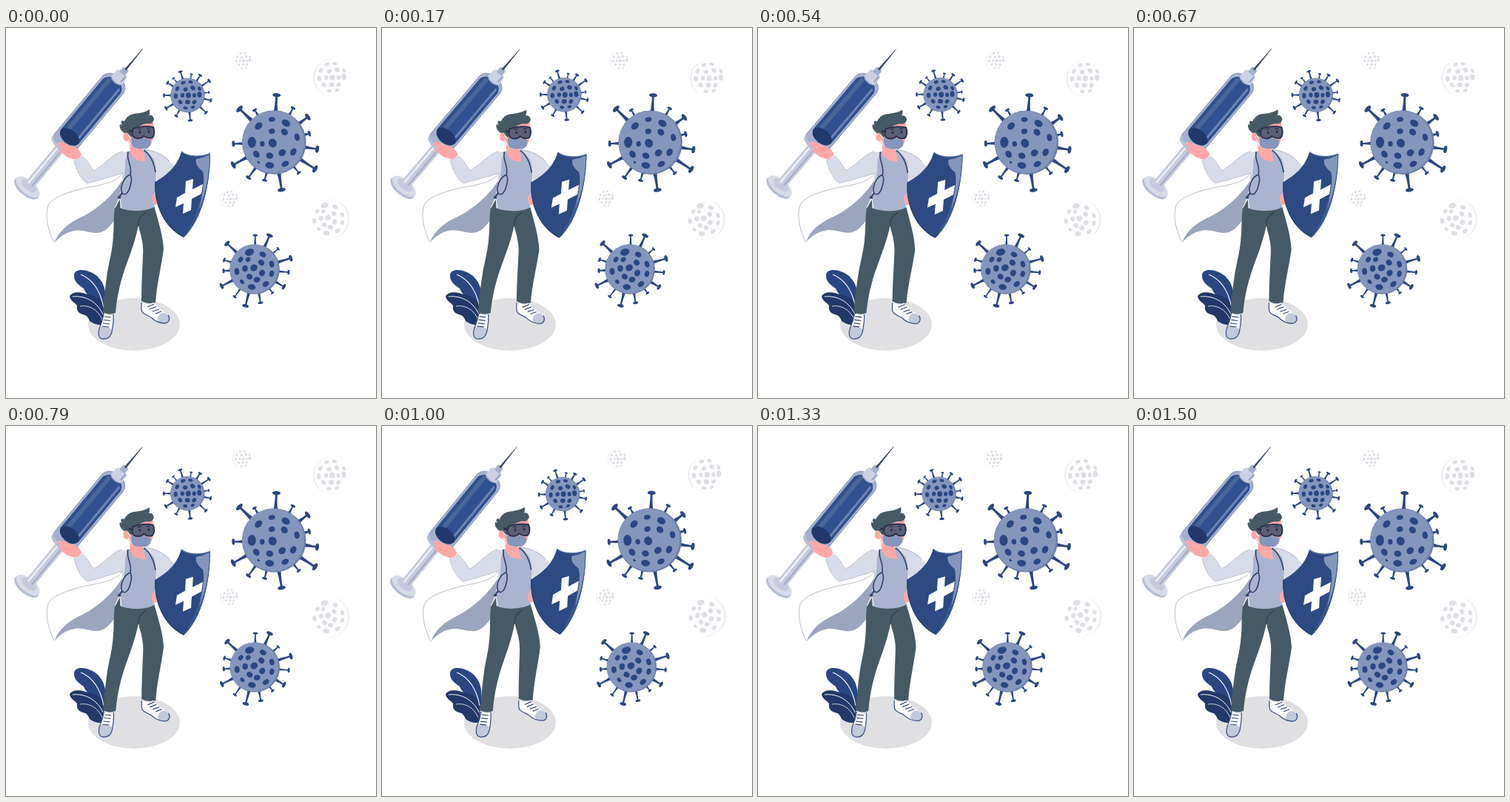
Animation, 500 px wide and 500 px high, one loop 1540 ms. Source, as an HTML page with a canvas:

```html
<!DOCTYPE html>
<html lang="en">
<head>
<meta charset="utf-8">
<title>Defence</title>
<style>
html, body { margin: 0; width: 100%; height: 100%; overflow: hidden; background: #fff; }
canvas { display: block; width: 500px; height: 500px; }
</style>
</head>
<body>
<canvas id="stage" width="500" height="500"></canvas>
<script>
const ctx = document.getElementById('stage').getContext('2d');
const LOOP = 1540, FPS = 24, SWAY = 1500;

const NAVY = '#2a4782', DEEP = '#22386a', MID = '#8596bd', PALE = '#d8dce8',
      SLATE = '#455a64', SKIN = '#ffa8a7', CAPE = '#9ca5be', SHIRT = '#aab4cf', GHOST = '#dddfe5';

function fill(d, color) {
  ctx.fillStyle = color;
  ctx.fill(new Path2D(d));
}

function line(d, color, width = 1) {
  ctx.strokeStyle = color;
  ctx.lineWidth = width;
  ctx.stroke(new Path2D(d));
}

function oval(x, y, rx, ry, color, turn = 0) {
  ctx.fillStyle = color;
  ctx.beginPath();
  ctx.ellipse(x, y, rx, ry, turn, 0, Math.PI * 2);
  ctx.fill();
}

function placed(x, y, turn, draw) {
  ctx.save();
  ctx.translate(x, y);
  ctx.rotate(turn);
  draw();
  ctx.restore();
}

// Runs draw with the picture turned about a pivot.
function swayed(x, y, turn, draw) {
  placed(x, y, turn, () => { ctx.translate(-x, -y); draw(); });
}

// Spots are [dx, dy, size]; they flatten toward the rim of the ball.
function spots(list, r, color, scale = 1) {
  for (const [dx, dy, size] of list) {
    const x = dx * scale, y = dy * scale, s = size * scale;
    const depth = Math.sqrt(Math.max(0.2, 1 - (x * x + y * y) / (r * r)));
    oval(x, y, s * (0.35 + 0.55 * depth), s, color, Math.atan2(y, x));
  }
}

// Spikes are [degrees, reach, cap size].
function virus({ x, y, r, spikes, marks, scale }) {
  placed(x, y, 0, () => {
    for (const [deg, reach, cap] of spikes) {
      placed(0, 0, deg * Math.PI / 180, () => {
        const w = cap * 0.55;
        fill(`M${r - 2} ${-w} Q${r + 3} ${-w * .5} ${reach} ${-w * .45} V${w * .45} Q${r + 3} ${w * .5} ${r - 2} ${w}Z`, NAVY);
        oval(reach, 0, cap * 0.48, cap, NAVY);
      });
    }
    oval(0, 0, r, r, '#6d80ad');
    oval(-r * .025, -r * .015, r * .965, r * .975, MID);
    spots(marks, r, NAVY, scale);
  });
}

function ghost({ x, y, r, side, marks, scale }) {
  placed(x, y, 0, () => {
    ctx.fillStyle = GHOST;
    ctx.beginPath();
    ctx.arc(0, 0, r, -Math.PI / 2, Math.PI / 2, side < 0);
    ctx.ellipse(side * r * .02, 0, r * .94, r * .99, 0, Math.PI / 2, -Math.PI / 2, side > 0);
    ctx.fill();
    spots(marks, r, GHOST, scale);
  });
}

const bigMarks = [
  [-21, -22, 5.7], [-3, -31, 4.5], [16, -26, 6], [-3, -15, 4.2], [14, -14, 5], [31, -7, 5],
  [-30, 0, 7.5], [-16, 2, 3.7], [-2, 1, 6], [26, 13, 5.3], [11, 14, 5.2], [-24, 16, 5.2],
  [-6, 18, 4.9], [-6, 31, 6], [15, 29, 5.2], [-21, 27, 2]
];
const lowMarks = [
  [-7, -23, 6.3], [11, -20, 4.5], [-19, -13, 4], [-9, -13, 3.6], [9, -9, 4.3], [23, -7, 4.4],
  [-1, -2, 5], [-13, -1, 4.3], [-24, 3, 4.6], [10, 5, 4.5], [23, 6, 4.2],
  [-7, 10, 4.2], [3, 14, 4.5], [-4, 24, 5.3], [15, 20, 4.6], [-17, 17, 3.4]
];
const topMarks = [
  [-6, -17, 3.2], [4, -18, 3], [-14, -9, 3.3], [-3, -8, 3.2], [7, -10, 3.4], [16, -9, 3],
  [-16, 1, 3.5], [-7, 0, 3], [1, 0, 3.8], [9, 0, 3], [16, -1, 4],
  [-10, 9, 3.2], [0, 9, 3.5], [9, 9, 3.2], [-3, 17, 3], [7, 16, 2.8]
];

const viruses = [
  { x: 362.3, y: 154.5, r: 43.3, marks: bigMarks, spikes: [
    [-87, 64, 5.5], [-61, 53, 3.5], [-37, 57, 5.3], [-14, 49, 4], [9, 59, 5], [33, 66, 5.5], [51, 53, 3.3],
    [81, 65, 5.5], [104, 53, 3.5], [126, 59, 4], [151, 63, 5.3], [178, 55, 4.2], [224, 65, 5.7], [239, 51, 3.3]] },
  { x: 336, y: 326, r: 33.8, marks: lowMarks, spikes: [
    [-89, 46, 3.3], [-66, 50, 4.6], [-41, 42, 2.8], [-17, 51, 4.5], [5, 46, 3.3], [31, 46, 4.2], [53, 40, 2.7],
    [80, 46, 3.5], [104, 51, 4.4], [126, 46, 3], [153, 50, 4.3], [177, 42, 3.3], [197, 43, 3.2], [223, 51, 4.6]] },
  { x: 245.5, y: 91, r: 23.2, marks: topMarks, spikes: [
    [-107, 33.5, 3], [-80, 29, 2.2], [-58, 32, 3], [-34, 35, 3.2], [-8, 29, 2.2], [12, 32, 3], [43, 34, 3],
    [84, 34, 3.3], [119, 32, 2.8], [149, 34, 3.2], [180, 32, 3], [212, 32, 3], [230, 30, 2.2]] }
];

const ghosts = [
  { x: 440, y: 67, r: 24.5, side: -1, marks: topMarks, scale: 1.05 },
  { x: 436, y: 258, r: 27.5, side: 1, marks: lowMarks, scale: .8 },
  { x: 320.3, y: 44.3, r: 13.5, side: -1, marks: topMarks, scale: .58 },
  { x: 302.7, y: 231, r: 13, side: -1, marks: topMarks, scale: .55 }
];

function ground() {
  oval(173, 400.5, 62, 35.5, '#e0e0e3');
  fill('M131 373 C113 364 107 358 105 352 C97 347 91 341 92 333 C94 326 104 326 112 329 C124 333 132 343 134 356 V386Z', NAVY);
  fill('M86 363 C88 357 98 356 107 359 C120 361 129 366 133 376 L132 400 C125 403 117 399 113 396 C111 391 109 389 107 388 C99 386 95 383 96 376 C96 372 88 371 86 363Z', DEEP);
  line('M101 333 C118 340 128 357 132 378', '#fff', 1.1);
  line('M90 363 C108 361 124 371 131 387', '#fff', 1);
  line('M100 376 C112 374 124 380 130 394', '#fff', .8);
}

// Drawn along its own axis: thumb plate at 0, needle point at 243.
function syringe() {
  placed(29, 215.5, -0.877, () => {
    oval(-2, 0, 9.5, 20, '#b4bdd3');
    oval(1, 0, 9.3, 19.3, PALE);
    oval(3, 0, 6, 12, '#c5cbdd');
    fill('M4 -7 H80 V7 H4 Q0 0 4 -7Z', '#c5cbdd');
    line('M5 -3 H75', '#eef0f5', 2.4);
    line('M5 3.5 H75', '#a2acc8', 2);
    fill('M73 -18 C65 -16 63 16 72 20 Q80 24 85 18 V-18Z', '#b8c1d8');
    fill('M77 -18.5 H181 C190 -17 194 -8 194 0 C194 9 190 17 181 18.5 H77 C69 14 69 -14 77 -18.5Z', '#a4b0cd');
    line('M77 -18.2 H181 C190 -17 194 -8 194 0 C194 9 190 17 181 18.2 H77', '#8090b9', .8);
    fill('M89 -15.5 H178 C186 -14 189 -6 189 0 C189 7 186 14 178 15.5 H89 C80 11 80 -11 89 -15.5Z', '#30508f');
    fill('M95 -11 H183 Q185 -8 186 -5 H96Z', '#486699');
    fill('M96 9 H183 L181 12 H95Z', '#6e84b1');
    oval(89, 0, 9.5, 15, DEEP);
    oval(190, 0, 6, 10, '#aab5cf');
    fill('M188 -9 H198 Q202 -8 202 -5 V5 Q202 8 198 9 H188 Q184 0 188 -9Z', '#ccd2e1');
    line('M190 6 H200', '#91a0c1', 2);
    fill('M200 -4.5 H208 Q211 0 208 4.5 H200Z', '#a4b0cd');
    fill('M207 -1.5 L243.5 -.3 V.3 L207 1.5Z', '#3d4a64');
  });
}

function coat() {
  line('M158 195 C152 206 139 210 118 214 C95 218 63 227 57 240 C52 257 58 275 65 290', '#a1a4ad', .7);
  fill('M65.5 290 C71 275 83 264 105 254 C126 243 145 225 157 206 L160 235 L148 258 C140 269 133 277 122 277 C112 277 103 272 92 274 C81 276 73 282 65.5 290Z', CAPE);
  fill('M187 164 C201 166 213 171 221 180 L231 190 L207 214 L199 190Z', PALE);
  line('M187 164 C201 166 213 171 221 180', '#8a8f9e', .6);
}

function legs() {
  fill('M153 231 L147 243 C145 258 146 270 145 280 C144 300 140 313 137 330 C134 350 132 368 131 384 Q139 389 148 385 C150 362 155 340 164 316 C171 297 176 282 179 266 L180 272 C184 285 186 295 185 308 C184 330 183 350 183 369 Q192 374 202 371 C204 345 210 322 213 299 C212 280 206 262 200 240Z', SLATE);
  line('M179 268 C178 260 181 254 190 249', '#32434b', 1.4);

  fill('M132 386 Q139 389 145 387 C146 396 144 405 143 411 C141 418 136 421 130 420 C125 419 124 413 126 406 C129 399 131 393 132 386Z', '#fff');
  fill('M127 404 C133 402 139 404 143 407 C142 417 137 421 130 420 C125 418 124 411 127 404Z', '#c2c9da');
  line('M132 386 C131 394 129 399 126 406 C124 413 125 419 130 420 C136 421 141 418 143 411 C144 405 146 396 145 387', '#3f5587', 1.3);
  line('M133 390 L142 391 M132 394.5 L141 395.5 M131 399 L140 400 M130 403 L139 404', '#2f426c', 1.2);

  fill('M183 371 Q191 375 199 371 C206 379 213 383 219 388 C222 392 221 398 215 399 C207 399 201 396 196 391 C189 387 183 386 183 380Z', '#fff');
  fill('M209 386 C214 383 219 387 221 392 C221 398 216 400 209 398 C204 397 203 391 209 386Z', '#c2c9da');
  line('M183 371 V380 C183 386 189 387 196 391 C201 396 207 399 215 399 C221 398 222 392 219 388', '#3f5587', 1.3);
  line('M191 377 L200 373 M194 380 L203 376.5 M198 383 L207 380 M202 386 L210 383', '#2f426c', 1.2);
}

function torso() {
  fill('M159 169 L168 166 L188 165 L200 177 C205 195 202 220 200 242 C188 249 164 248 154 243 C154 231 157 220 157 203 C158 188 160 180 159 169Z', SHIRT);
  fill('M167 154 L168 169 C172 178 179 180 188 180 C188 173 186 168 184 161Z', SKIN);
  fill('M157 167 C148 168 138 179 126 188 C121 192 119 193 117 191 C112 182 107 176 103 173 L92 179 C95 193 102 205 110 210 C121 207 140 202 158 196 L156 216 L148 242 C154 231 162 200 161 180 L164 169Z', PALE);
  line('M157 167 C148 168 138 179 126 188 C121 192 119 193 117 191 C112 182 107 176 103 173 M92 179 C95 193 102 205 110 210 C121 207 140 202 158 196', '#a1a4ad', .55);
  line('M147 243 L154 230 L156 243', '#f2f3f6', 1.2);
  line('M165 167 C162 179 171 185 168 198 C158 202 154 216 157 223 C161 228 166 222 168 213 C170 207 170 202 168 198', '#2f426c', 1.6);
  line('M157 223 L153 228', '#2f426c', 2.2);
  oval(153, 229, 2.4, 1.7, '#2f426c');
  line('M186 165 C193 169 200 180 202 195', '#2f426c', 1.6);
}

function head() {
  fill('M164 135 C173 124 189 124 198 126 C201 136 200 150 195 159 C185 165 173 164 168 159 L164 152Z', SKIN);
  oval(163, 147, 4.6, 6, SKIN);
  fill('M160 142 C154 138 153 133 154 130 L157 131 C154 127 156 124 160 126 C163 120 167 117 173 116 C181 115 188 114 194 110 Q195 115 193 118 C197 117 200 120 200 124 C198 129 195 130 190 129 C182 131 175 135 172 140 C171 147 169 150 167 146 C165 141 163 141 160 142Z', SLATE);
  line('M165 151 C168 156 167 158 172 160 M165 145 L171 150', '#fff', 1.1);
  fill('M169 147 C174 151 181 150 186 148 C190 150 194 150 196 152 C196 157 194 161 190 163 C182 164 174 163 170 159Z', MID);
  fill('M172 136 C179 133 191 132 199 134 C201 138 201 145 198 148 C193 150 189 148 186 146 C183 150 175 150 172 147 C170 143 170 140 172 136Z', '#5c6076');
  line('M172 136 C179 133 191 132 199 134 C201 138 201 145 198 148 C193 150 189 148 186 146 C183 150 175 150 172 147 C170 143 170 140 172 136Z', '#29324e', 2);
  line('M166 139 L172 140', '#29324e', 3);
  oval(181, 141, 1.5, 2, '#29324e');
  oval(193, 140, 1.5, 2, '#29324e');
  line('M178 137 L183 136 M190 136 L195 136', '#29324e', 1.2);
}

function shield() {
  oval(201.5, 231, 4.5, 8, SKIN);
  fill('M237 167 C245 174 263 175 276 169.5 C276 211 265 260 240 283 C213 269 200 237 201.5 208 C217 199 231 188 237 167Z', '#2d4a83');
  fill('M237 167 C245 174 263 175 276 169.5 C276 211 265 260 240 283 C257 258 269 220 270 174 C258 176 246 174 237 167Z', '#385891');
  fill('M257 177 Q266 176 275 171.5 C275 199 270 223 261 245 C266 222 269 206 266 194 C261 190 255 184 257 177Z', '#8596bd');
  line('M237 167 C245 174 263 175 276 169.5', '#53709f', 1.2);
  line('M202 208 C200 237 213 269 240 282', '#243c70', 1.3);
  fill('M243 207 L253 204 L252 218 L266 211 L264 224 L251 231 L250 246 L239 251 L240 237 L229 242 L231 229 L242 223Z', '#fff');
}

function hand() {
  fill('M74 162 C69 158 68 155 72 154 C77 154 83 158 88 160 C94 160 99 164 102 171 C101 175 97 177 92 178 L88 176 C84 176 78 171 72 166Z', SKIN);
  line('M76 164 C81 166 84 168 88 168', '#f28f8f', .8);
}

function hero() {
  coat();
  legs();
  torso();
  head();
  syringe();
  hand();
  shield();
}

// Linear swing: 0 to +1 degree, to -1 degree, back to 0.
function swing(ms) {
  const p = ms / SWAY;
  const degrees = p < .25 ? p * 4 : p < .75 ? 2 - p * 4 : p * 4 - 4;
  return degrees * Math.PI / 180;
}

function frame(now) {
  const step = Math.min(36, Math.floor((now % LOOP + 4) * FPS / 1000));
  const turn = swing(step * 1000 / FPS);
  ctx.fillStyle = '#fff';
  ctx.fillRect(0, 0, 500, 500);
  ground();
  swayed(337, 204, turn, () => {
    ghosts.forEach(ghost);
    viruses.forEach(virus);
  });
  swayed(144.5, 224.5, turn, hero);
}

const start = performance.now();
function tick() {
  frame(performance.now() - start);
  requestAnimationFrame(tick);
}
tick();
</script>
</body>
</html>
```
